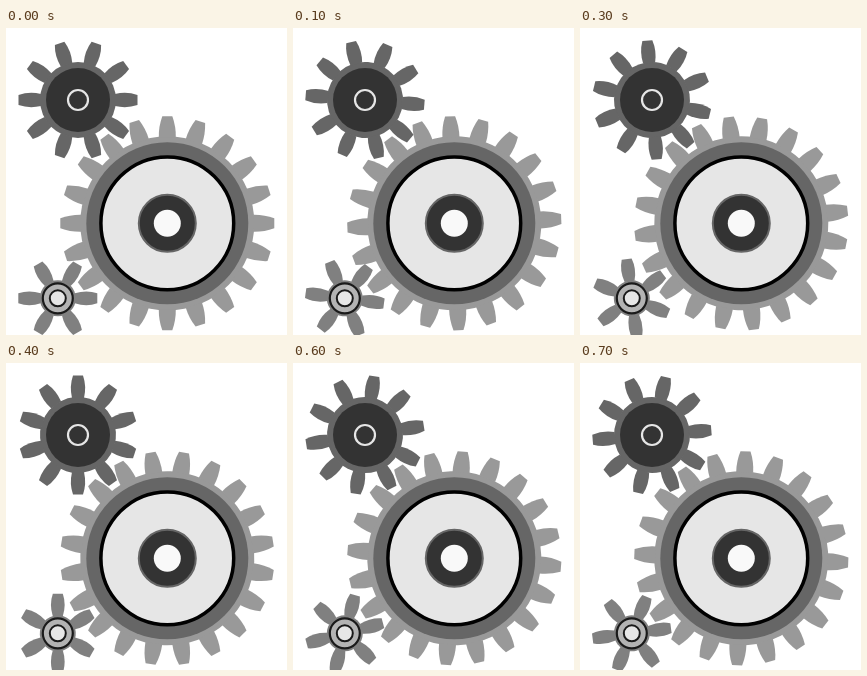
Animation of 281x307 px, one loop 0.8 s. Source, as an HTML page:

```html
<!DOCTYPE html>
<html>
<head>
<meta charset="utf-8">
<style>
html, body { margin: 0; width: 100%; height: 100%; overflow: hidden; background: #fff; }
svg { display: block; }
</style>
</head>
<body>
<svg width="281" height="307" viewBox="0 0 281 307">
  <g transform="translate(161.3 195.3)">
    <g id="big" fill="#999"/>
    <circle r="81" fill="#666"/>
    <circle r="66.4" fill="#e6e6e6" stroke="#000" stroke-width="3.5"/>
    <circle r="28.5" fill="#333" stroke="#666" stroke-width="2"/>
    <circle r="13.5" fill="#f9f9f9"/>
  </g>
  <g transform="translate(72 72)">
    <g id="mid" fill="#666"/>
    <circle r="32" fill="#333"/>
    <circle r="10" fill="none" stroke="#e6e6e6" stroke-width="2.2"/>
  </g>
  <g transform="translate(51.8 270.3)">
    <g id="small" fill="#808080"/>
    <circle r="15" fill="#b3b3b3" stroke="#1a1a1a" stroke-width="2.2"/>
    <circle r="8" fill="#e6e6e6" stroke="#1a1a1a" stroke-width="2"/>
  </g>
</svg>
<script>
const STEP = 100, STEPS = 8, TIP = 5, BULGE = 8.7;

// a round body with equal, slightly bulging teeth
function makeGear(id, teeth, phase, dir, body, outer, root) {
  const el = document.getElementById(id);
  const low = 1 - body, mid = -(body + outer) / 2, pitch = 360 / teeth;
  const tooth = `M${-root} ${low}Q${-BULGE} ${mid} ${-TIP} ${-outer}H${TIP}Q${BULGE} ${mid} ${root} ${low}Z`;
  let parts = `<circle r="${body}"/>`;
  for (let i = 0; i < teeth; i++)
    parts += `<path d="${tooth}" transform="rotate(${(i + phase) * pitch})"/>`;
  el.innerHTML = parts;
  return { el, turn: dir * pitch };
}

const gears = [
  makeGear("big", 20, 0, -1, 87, 107, 8.5),
  makeGear("mid", 10, 0.5, 1, 38, 59.5, 6),
  makeGear("small", 6, 0.5, 1, 18, 39.5, 5)
];

// every gear advances one tooth per loop
function draw(now) {
  const part = Math.floor(now / STEP) % STEPS / STEPS;
  for (const g of gears) g.el.setAttribute("transform", `rotate(${g.turn * part})`);
  requestAnimationFrame(draw);
}
draw(performance.now());
</script>
</body>
</html>
```
